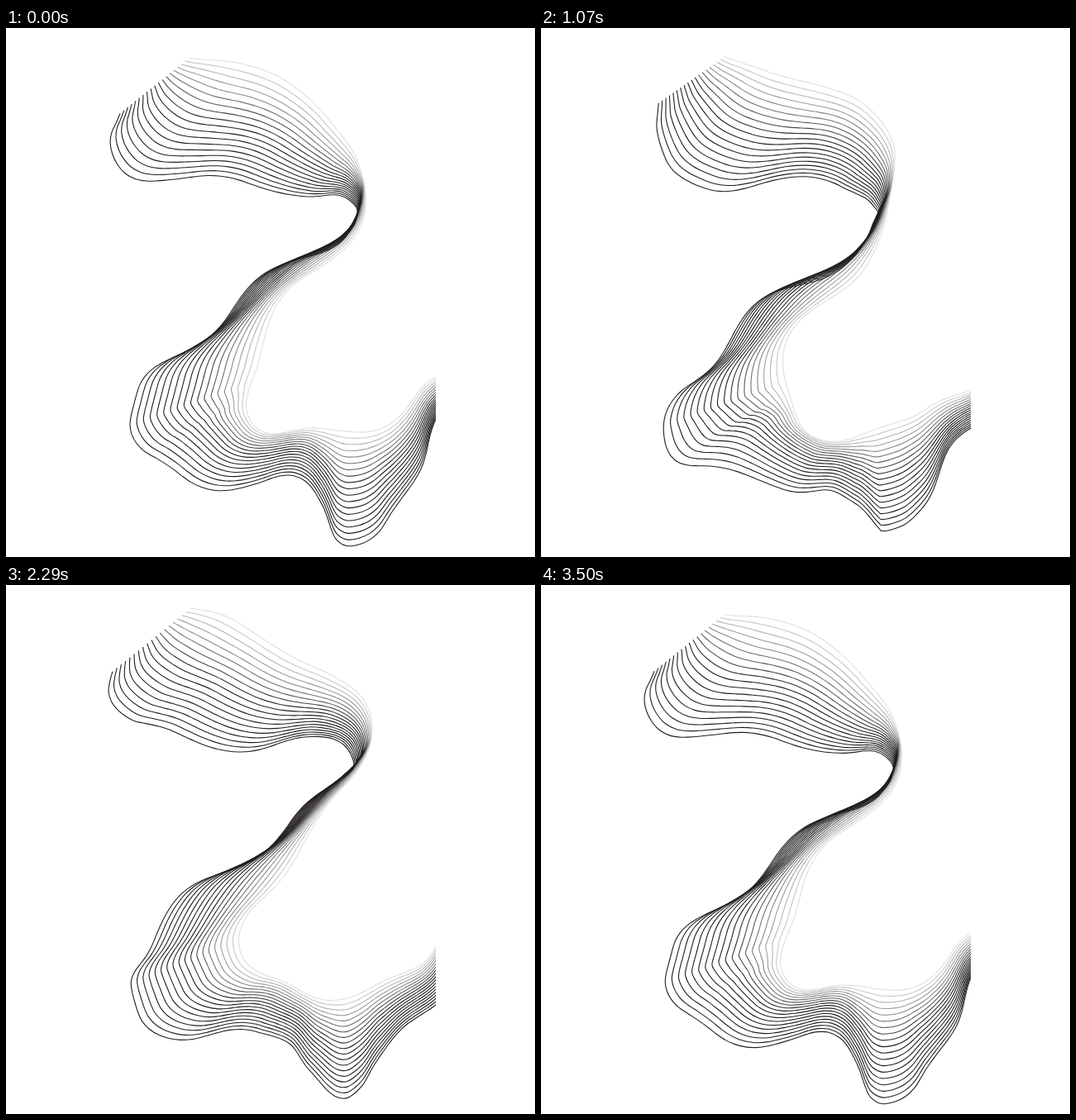
These frames come from a looping animation (640 px wide and 640 px high, 3570 ms). An HTML page:

```html
<!DOCTYPE html>
<html lang="en">
<head>
<meta charset="utf-8">
<title>Flowing lines</title>
<style>
  html, body { margin: 0; width: 100%; height: 100%; overflow: hidden; background: #fff; }
  svg { display: block; width: 100vw; height: 100vh; }
  path { fill: none; stroke: #231f20; stroke-width: 1.1; }
</style>
</head>
<body>
<svg viewBox="0 0 640 640">
  <clipPath id="crop"><rect width="520" height="640"/></clipPath>
  <g id="ribbon" clip-path="url(#crop)"></g>
</svg>
<script>
const LOOP = 3570, STEPS = 50, LINES = 19, SPACING = 12;
const RAD = Math.PI / 180;

// The ribbon is a blend between two resting paths, each carrying a travelling wave.
// Anchors pair up the paths; phase is the wave's delay in degrees at each anchor.
const dark = edge({
  path: [
    [136, 100], [130, 130], [150, 167], [200, 184], [290, 191], [365, 193], [407, 204],
    [418, 220], [404, 243], [350, 286], [275, 336], [215, 387], [165, 444],
    [150, 480], [164, 519], [210, 541], [300, 550], [350, 554], [378, 582],
    [412, 619], [435, 609], [458, 581], [490, 533], [545, 458]
  ],
  anchors: [0, 7, 13, 19, 21, 23],
  phase: [-120, 486, 1170, 1751, 1830, 1590],
  height: 11.5, calm: 0.85, slip: 10
});
const pale = edge({
  path: [
    [222, 33], [262, 41], [300, 55], [345, 76], [392, 105], [429, 149],
    [434, 184], [427, 222], [386, 284], [347, 325], [318, 361], [299, 395],
    [291, 428], [295, 457], [312, 479], [350, 491],
    [412, 491], [448, 481], [485, 460], [545, 410]
  ],
  anchors: [0, 6, 12, 16, 17, 19],
  phase: [45, 440, 950, 1332, 1385, 1156],
  height: 9.5, calm: 0, slip: 0
});

// Smooth curve through values at uneven knots.
function spline(knots, vals, t) {
  const last = knots.length - 1;
  let i = 0;
  while (i < last - 1 && t > knots[i + 1]) i++;
  const chord = j => (vals[j + 1] - vals[j]) / (knots[j + 1] - knots[j]);
  const slope = j => {
    if (j === 0) return chord(0);
    if (j === last) return chord(last - 1);
    const before = knots[j] - knots[j - 1], after = knots[j + 1] - knots[j];
    return (chord(j - 1) * after + chord(j) * before) / (before + after);
  };
  const h = knots[i + 1] - knots[i], f = (t - knots[i]) / h, g = 1 - f;
  return vals[i] * g * g * (1 + 2 * f) + vals[i + 1] * f * f * (3 - 2 * f) +
    h * f * g * (slope(i) * g - slope(i + 1) * f);
}

function edge({ path, anchors, ...wave }) {
  const knots = [0];
  for (let i = 1; i < path.length; i++) {
    const [[ax, ay], [bx, by]] = [path[i - 1], path[i]];
    knots.push(knots[i - 1] + Math.hypot(bx - ax, by - ay));
  }
  const xs = path.map(p => p[0]), ys = path.map(p => p[1]);
  const at = t => [spline(knots, xs, t), spline(knots, ys, t)];
  return { at, stops: anchors.map(i => knots[i]), ...wave };
}

// Resting place, normal and wave strength of an edge at distance t.
function station({ at, stops, phase, height, calm, slip }, t) {
  const [x, y] = at(t), [ax, ay] = at(t - 1), [bx, by] = at(t + 1);
  const len = Math.hypot(bx - ax, by - ay);
  const still = calm * Math.exp(-(((t - stops[2]) / 40) ** 2));
  return {
    x, y, nx: (ay - by) / len, ny: (bx - ax) / len,
    phase: spline(stops, phase, t) * RAD,
    amp: height * (1 - still) * (1 - 0.5 * Math.exp(-t / 60)),
    slip: slip * Math.exp(-((t / 70) ** 2))
  };
}

// The middle lines hug the dark edge along the neck and cut the corner below it.
function bowAt(section, f) {
  if (section === 1) return 6 * Math.sin(Math.PI * f) ** 2;
  if (section === 2) return -14 * Math.sin(Math.PI * Math.sqrt(f)) ** 2;
  return 0;
}

const stations = [];
for (let k = 0; k < dark.stops.length - 1; k++) {
  const along = (e, f) => e.stops[k] + f * (e.stops[k + 1] - e.stops[k]);
  const n = Math.round((dark.stops[k + 1] - dark.stops[k]) / SPACING);
  for (let j = 0; j < n; j++) {
    const f = j / n;
    stations.push({
      from: station(dark, along(dark, f)),
      to: station(pale, along(pale, f)),
      bow: bowAt(k, f)
    });
  }
}

const ribbon = document.getElementById("ribbon");
const lines = Array.from({ length: LINES }, (_, i) => {
  const u = i / (LINES - 1);
  const el = document.createElementNS("http://www.w3.org/2000/svg", "path");
  el.setAttribute("stroke-opacity", Math.min(1, 1.9 - 1.76 * u));
  ribbon.append(el);
  return { el, u };
});

function sway(p, angle) {
  const d = p.amp * Math.cos(angle - p.phase);
  const slip = p.slip * Math.cos(angle + 75 * RAD);
  return [p.x + p.nx * d - slip / 4, p.y + p.ny * d + slip];
}

function curve(pts) {
  const last = pts.length - 1;
  const slope = (i, k) => (pts[Math.min(last, i + 1)][k] - pts[Math.max(0, i - 1)][k]) / 6;
  const f = n => n.toFixed(2);
  let d = `M${f(pts[0][0])} ${f(pts[0][1])}`;
  for (let i = 0; i < last; i++) {
    const a = pts[i], b = pts[i + 1];
    d += `C${f(a[0] + slope(i, 0))} ${f(a[1] + slope(i, 1))} ` +
      `${f(b[0] - slope(i + 1, 0))} ${f(b[1] - slope(i + 1, 1))} ${f(b[0])} ${f(b[1])}`;
  }
  return d;
}

function draw(ms) {
  const step = Math.floor(((ms % LOOP) + 5) / (LOOP / STEPS)) % STEPS;
  const angle = 2 * Math.PI * step / STEPS;
  const swell = 1 + 0.6 * Math.sin(angle);
  const posed = stations.map(({ from, to, bow }) => ({
    a: sway(from, angle),
    b: sway(to, angle),
    bow: [from.nx * bow * swell, from.ny * bow * swell]
  }));
  for (const { el, u } of lines) {
    const bend = 4 * u * (1 - u);
    const pts = posed.map(({ a, b, bow }) =>
      [0, 1].map(k => a[k] + (b[k] - a[k]) * u + bow[k] * bend));
    el.setAttribute("d", curve(pts));
  }
}

const start = performance.now();
function tick() {
  draw(performance.now() - start);
  requestAnimationFrame(tick);
}
tick();
</script>
</body>
</html>
```
